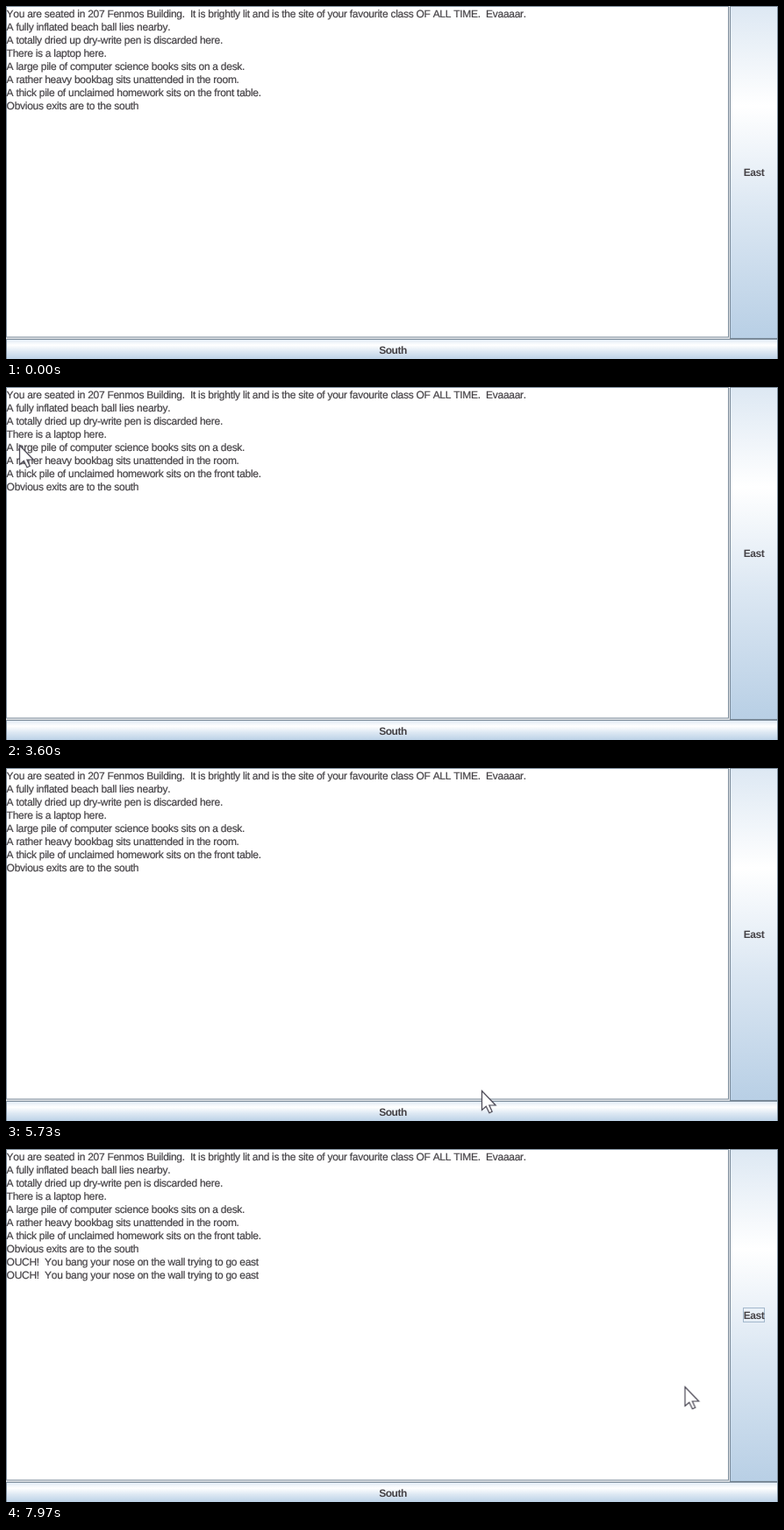
An HTML page that plays this animation: 880x403 px, repeating every 8000 ms.

```html
<!DOCTYPE html>
<html lang="en">
<head>
<meta charset="utf-8">
<title>Text adventure</title>
<style>
  html, body { margin: 0; width: 100%; height: 100%; overflow: hidden; background: #fff; }
  svg { display: block; width: 880px; height: 403px; }
  text {
    font: 12px "Liberation Sans", Arial, sans-serif;
    font-kerning: none;
    text-rendering: geometricPrecision;
    white-space: pre;
    letter-spacing: -.27px;
    fill: #454246;
    stroke: #454246;
    stroke-width: .2px;
  }
  .label { font-weight: bold; letter-spacing: -.5px; text-anchor: middle; stroke: none; }
  .line { fill: none; stroke: #7a8a99; }
  .soft { fill: none; stroke: #b8cfe5; }

  /* One shared 8 s clock: 1% = 80 ms */
  .timed { animation: 8s step-end infinite; visibility: hidden; }
  .hover { animation-name: hover; }
  .press { animation-name: press; }
  .focus { animation-name: focus; }
  .bump1 { animation-name: bump1; }
  .bump2 { animation-name: bump2; }
  .pointer { animation-name: appear; }
  .pointer path { animation: travel 8s ease-in-out infinite; }

  @keyframes hover { 0%, 97.2% { visibility: hidden } 77.2% { visibility: visible } }
  @keyframes press {
    0%, 85.4%, 90.4% { visibility: hidden }
    84.4%, 89.4% { visibility: visible }
  }
  @keyframes focus { 0% { visibility: hidden } 84.4%, 100% { visibility: visible } }
  @keyframes bump1 { 0% { visibility: hidden } 85.4%, 100% { visibility: visible } }
  @keyframes bump2 { 0% { visibility: hidden } 90.4%, 100% { visibility: visible } }
  @keyframes appear { 0% { visibility: hidden } 31.6%, 100% { visibility: visible } }
  @keyframes travel {
    0%, 31.6% { transform: translate(232px, 203px) }
    33.5% { transform: translate(207px, 187px) }
    45.1% { transform: translate(15px, 66px) }
    50% { transform: translate(18px, 92px) }
    55% { transform: translate(50px, 115px) }
    63.5% { transform: translate(325px, 262px) }
    72.9% { transform: translate(550px, 372px) }
    80.3%, 92.5% { transform: translate(847px, 152px) }
    99.5%, 100% { transform: translate(773.5px, 271px) }
  }
</style>
</head>
<body>
<svg viewBox="0 0 880 403">
  <defs>
    <linearGradient id="steel" x1="0" y1="0" x2="0" y2="1">
      <stop offset="0" stop-color="#dde8f3"/>
      <stop offset=".3" stop-color="#fff"/>
      <stop offset=".6" stop-color="#dde8f3"/>
      <stop offset="1" stop-color="#b8cfe5"/>
    </linearGradient>
  </defs>

  <rect width="880" height="403" fill="#e4e7ea"/>
  <rect class="line" x=".5" y=".5" width="823" height="377.5" style="fill:#fff"/>
  <g id="story"></g>

  <rect x="825" width="55" height="380" fill="url(#steel)"/>
  <rect class="line" x="825.5" y=".5" width="54" height="379"/>
  <g class="timed hover">
    <rect class="soft" x="825.5" y=".5" width="54" height="379"/>
    <rect class="soft" x="827.5" y="2.5" width="50" height="375"/>
    <rect class="line" x="826.5" y="1.5" width="52" height="377"/>
  </g>
  <g class="timed press">
    <rect x="825" width="55" height="380" fill="#b8cfe5"/>
    <rect class="line" x="825.5" y=".5" width="54" height="379"/>
    <path class="line" d="M826.5 379V1.5H879"/>
  </g>
  <rect class="timed focus" x="840.5" y="181.5" width="24" height="16" fill="none" stroke="#a3b8cc"/>
  <text class="label" x="852.5" y="194">East</text>

  <rect y="380" width="880" height="24" fill="url(#steel)"/>
  <rect class="line" x=".5" y="380.5" width="879" height="24"/>
  <text class="label" x="441" y="396.7">South</text>

  <g class="timed pointer">
    <path d="M.5.5V22.5L5.3 18.2L9 25.7L12.2 24.2L8.9 17H16.2Z" fill="#fff" stroke="#45424f" stroke-width="1.2"/>
  </g>
</svg>
<script>
  const bump = "OUCH!  You bang your nose on the wall trying to go east";
  const lines = [
    "You are seated in 207 Fenmos Building.  It is brightly lit and is the site of your favourite class OF ALL TIME.  Evaaaar.",
    "A fully inflated beach ball lies nearby.",
    "A totally dried up dry-write pen is discarded here.",
    "There is a laptop here.",
    "A large pile of computer science books sits on a desk.",
    "A rather heavy bookbag sits unattended in the room.",
    "A thick pile of unclaimed homework sits on the front table.",
    "Obvious exits are to the south",
    bump,
    bump
  ];
  const story = document.getElementById("story");
  lines.forEach((line, i) => {
    const row = document.createElementNS(story.namespaceURI, "text");
    row.textContent = line;
    row.setAttribute("x", 0.6);
    row.setAttribute("y", 13 + 15 * i);
    if (i > 7) row.setAttribute("class", "timed bump" + (i - 7));
    story.append(row);
  });
</script>
</body>
</html>
```
